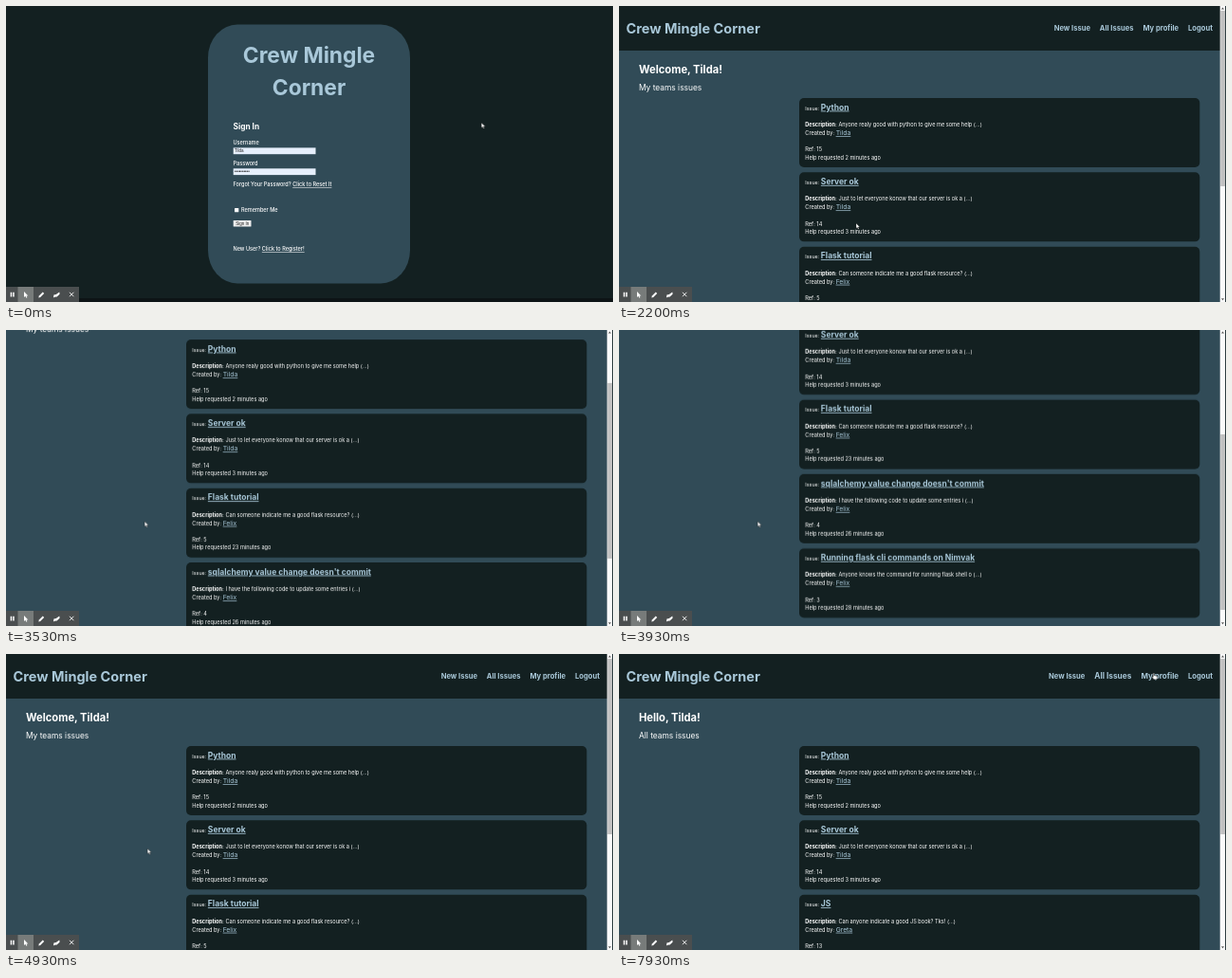
Write an HTML page that moves like this. It is 640 px wide and 312 px high and loops after 8 s.

```html
<!DOCTYPE html>
<html lang="en">
<head>
<meta charset="utf-8">
<title>Issue board</title>
<style>
html, body { margin: 0; width: 100%; height: 100%; overflow: hidden; background: #132021; }
svg { display: block; width: 640px; height: 312px; font-family: Inter, sans-serif; fill: #fff; }
text { white-space: pre; }
.dark { fill: #132021; }
.slate { fill: #314b57; }
.head, .link { fill: #a9c8d9; font-weight: 700; }
.link, .name { text-decoration: underline; }
.name { fill: #a9c8d9; font-size: 6.8px; }
.title { font-size: 8.5px; }
.b { font-weight: 700; }
.form { font-size: 5.55px; font-weight: 500; }
.field { font: 4.5px "Liberation Sans", sans-serif; fill: #222; }
.card { font-size: 5.62px; }
.nav { font-size: 7.6px; text-anchor: end; }

.login, .board, .mine, .all, .arrow, .hand { animation: 8s step-end infinite; }
.login { animation-name: login; }
.board { animation-name: board; }
.mine { animation-name: mine; }
.all { animation-name: all; }
.arrow { animation-name: arrow; }
.hand { animation-name: hand; }
@keyframes login { 0% { opacity: 1 } 27.5%, 100% { opacity: 0 } }
@keyframes board { 0% { opacity: 0 } 27.5%, 100% { opacity: 1 } }
@keyframes mine { 0% { opacity: 1 } 88.25%, 100% { opacity: 0 } }
@keyframes all { 0% { opacity: 0 } 88.25%, 100% { opacity: 1 } }
@keyframes arrow { 0% { opacity: 1 } 77%, 100% { opacity: 0 } }
@keyframes hand { 0% { opacity: 0 } 77%, 100% { opacity: 1 } }

.page { animation: scroll 8s linear infinite; }
@keyframes scroll {
  0%, 41.5% { transform: translateY(0) }
  45.75%, 47.2% { transform: translateY(-140px) }
  49%, 54.3% { transform: translateY(-180.2px) }
  56.5%, 57.3% { transform: translateY(-65.2px) }
  58.7% { transform: translateY(-10px) }
  60%, 100% { transform: translateY(0) }
}
.thumb { animation: thumb 8s linear infinite; }
@keyframes thumb {
  0%, 41.5% { transform: translateY(0) }
  45.75%, 47.2% { transform: translateY(82px) }
  49%, 54.3% { transform: translateY(105px) }
  56.5%, 57.3% { transform: translateY(38px) }
  58.7% { transform: translateY(6px) }
  60%, 100% { transform: translateY(0) }
}
.issues { animation: issues 8s linear infinite; }
.profile { animation: profile 8s linear infinite; }
@keyframes issues {
  0%, 76.9% { font-size: 7.6px }
  79.4%, 98.25% { font-size: 8.75px }
  100% { font-size: 7.9px }
}
@keyframes profile {
  0%, 98.25% { font-size: 7.6px }
  100% { font-size: 8.45px }
}
.ring { opacity: 0; animation: ring 8s linear infinite; }
@keyframes ring {
  0%, 17.4% { opacity: 0 }
  17.5% { opacity: .35 }
  19.9% { opacity: .15 }
  20%, 100% { opacity: 0 }
}
.pointer { animation: move 8s linear infinite; }
@keyframes move {
  0%, .75% { transform: translate(501.3px, 123px) }
  2.5% { transform: translate(430px, 95px) }
  4.1% { transform: translate(320px, 79px) }
  5.75%, 7.5% { transform: translate(252px, 110px) }
  10.6% { transform: translate(262px, 160px) }
  13% { transform: translate(234px, 208px) }
  15.75%, 32.5% { transform: translate(250px, 229px) }
  38%, 40.5% { transform: translate(164.6px, 207.5px) }
  42.5%, 49.5% { transform: translate(146.2px, 201.7px) }
  56.5%, 59% { transform: translate(146.2px, 203.5px) }
  61.6% { transform: translate(149.2px, 205.2px) }
  65% { transform: translate(152px, 198px) }
  75.75% { transform: translate(526px, 42px) }
  78% { transform: translate(524px, 30px) }
  85.75%, 92% { transform: translate(522px, 23px) }
  99.1%, 100% { transform: translate(562.8px, 20px) }
}
</style>
</head>
<body>
<svg viewBox="0 0 640 312">
  <g class="login">
    <rect class="dark" width="640" height="312"/>
    <rect y="308" width="640" height="4" fill="#0d1416"/>
    <rect class="slate" x="213" y="19.5" width="213" height="273" rx="31" ry="35"/>
    <g class="head" font-size="22.8" text-anchor="middle">
      <text x="319.5" y="60">Crew Mingle</text>
      <text x="319.5" y="94.3">Corner</text>
    </g>
    <text class="b" x="239.5" y="130" font-size="8.3">Sign In</text>
    <g class="form">
      <text x="239.5" y="146">Username</text>
      <text x="239.5" y="168">Password</text>
      <text x="239.5" y="190">Forgot Your Password? <tspan text-decoration="underline">Click to Reset It</tspan></text>
      <text x="248" y="217.2">Remember Me</text>
      <text x="239.5" y="258.3">New User? <tspan text-decoration="underline">Click to Register!</tspan></text>
    </g>
    <g fill="#e6effc">
      <rect x="239.7" y="149.4" width="86.8" height="6.8"/>
      <rect x="239.7" y="171.3" width="86.8" height="6.8"/>
    </g>
    <rect x="241" y="213" width="4.3" height="4.3" rx=".6"/>
    <rect x="239.7" y="226" width="18.8" height="6.6" rx=".6" fill="#efefef"/>
    <g class="field">
      <text x="241" y="154.4">Tilda</text>
      <text x="241" y="176.3">••••••••••</text>
      <text x="242.2" y="230.9">Sign In</text>
    </g>
  </g>

  <g class="board">
    <rect class="slate" width="640" height="312"/>
    <g class="page">
      <rect class="dark" width="634" height="47"/>
      <text class="head" x="7.5" y="28.7" font-size="14.5">Crew Mingle Corner</text>
      <text class="head nav" x="626" y="26.2"><tspan>New Issue</tspan><tspan class="issues" dx="10">All Issues</tspan><tspan class="profile" dx="10">My profile</tspan><tspan dx="10">Logout</tspan></text>
      <g class="mine">
        <text class="b" x="21" y="70.7" font-size="11.2">Welcome, Tilda!</text>
        <text x="21" y="89" font-size="8.4">My teams issues</text>
      </g>
      <g class="all">
        <text class="b" x="21" y="70.7" font-size="11.2">Hello, Tilda!</text>
        <text x="21" y="89" font-size="8.4">All teams issues</text>
      </g>
      <g id="cards"></g>
    </g>
    <rect x="633.7" width="5.6" height="312" fill="#fafafa"/>
    <rect class="thumb" x="634.2" y="5" width="4.7" height="185" fill="#c1c1c1"/>
    <path d="M635 3.4l1.5-2 1.5 2zM635 308.2l1.5 2 1.5-2z" fill="#555"/>
    <rect class="dark" x="639.3" width=".7" height="312"/>
  </g>

  <g>
    <rect y="296" width="77" height="16" fill="#4a4e4f"/>
    <rect x="12.5" y="296" width="16.5" height="16" fill="#777b7a"/>
    <path d="M4.7 301.7h1.5v4.8h-1.5zM7.2 301.7h1.5v4.8h-1.5z"/>
    <path d="M19 301v6l1.4-1.2 1 2 1-.5-1-1.9h1.9z"/>
    <path d="M34.3 307.5l.5-1.9 4-4 1.4 1.4-4 4z"/>
    <path d="M50 307.4l.4-3 2.4-.4 3.5-2.6.3 2.4-3 2.8-2.4.1z"/>
    <path d="M67 301.8l4.4 4.4m0-4.4l-4.4 4.4" stroke="#fff" stroke-width=".9"/>
  </g>

  <g class="pointer">
    <circle class="ring" r="11.5"/>
    <path class="arrow" d="M0 0v5.4l1.2-1.1.9 1.9 1-.5-.9-1.8h1.7z" stroke="#111" stroke-width=".35"/>
    <path class="hand" d="M.3 .5q.7-.8 1.3 0v2.2l2.7.6q.7.3.5 1.2l-.5 2.3H1L-.8 4.3q.2-.8 1.1 0z" stroke="#111" stroke-width=".35"/>
  </g>
</svg>
<script>
const PITCH = 78.35;
const issues = [
  ["Python", "Anyone realy good with python to give me some help", "Tilda", 15, 2],
  ["Server ok", "Just to let everyone konow that our server is ok a", "Tilda", 14, 3],
  ["Flask tutorial", "Can someone indicate me a good flask resource?", "Felix", 5, 23],
  ["sqlalchemy value change doesn't commit", "I have the following code to update some entries i", "Felix", 4, 26],
  ["Running flask cli commands on Nimvak", "Anyone knows the command for running flask shell o", "Felix", 3, 28]
];
const latest = ["JS", "Can anyone indicate a good JS book? Tks!", "Greta", 13, 4];

const line = (y, body) => `<text x="196.3" y="${y}">${body}</text>`;

const card = ([title, about, author, ref, age], row, cls = "") => `
  <g class="${cls}"><g class="card" transform="translate(0 ${row * PITCH})">
    <rect class="dark" x="190" y="97" width="422.3" height="73" rx="5"/>
    ${line(109.5, `<tspan font-size="5.4">Issue: </tspan><tspan class="link title">${title}</tspan>`)}
    ${line(127, `<tspan class="b">Description:</tspan> ${about} (...)`)}
    ${line(136, `Created by: <tspan class="name">${author}</tspan>`)}
    ${line(153.4, `Ref: ${ref}`)}
    ${line(161.6, `Help requested ${age} minutes ago`)}
  </g></g>`;

document.getElementById("cards").innerHTML =
  issues.map((issue, row) => card(issue, row, row === 2 ? "mine" : "")).join("") +
  card(latest, 2, "all");
</script>
</body>
</html>
```
